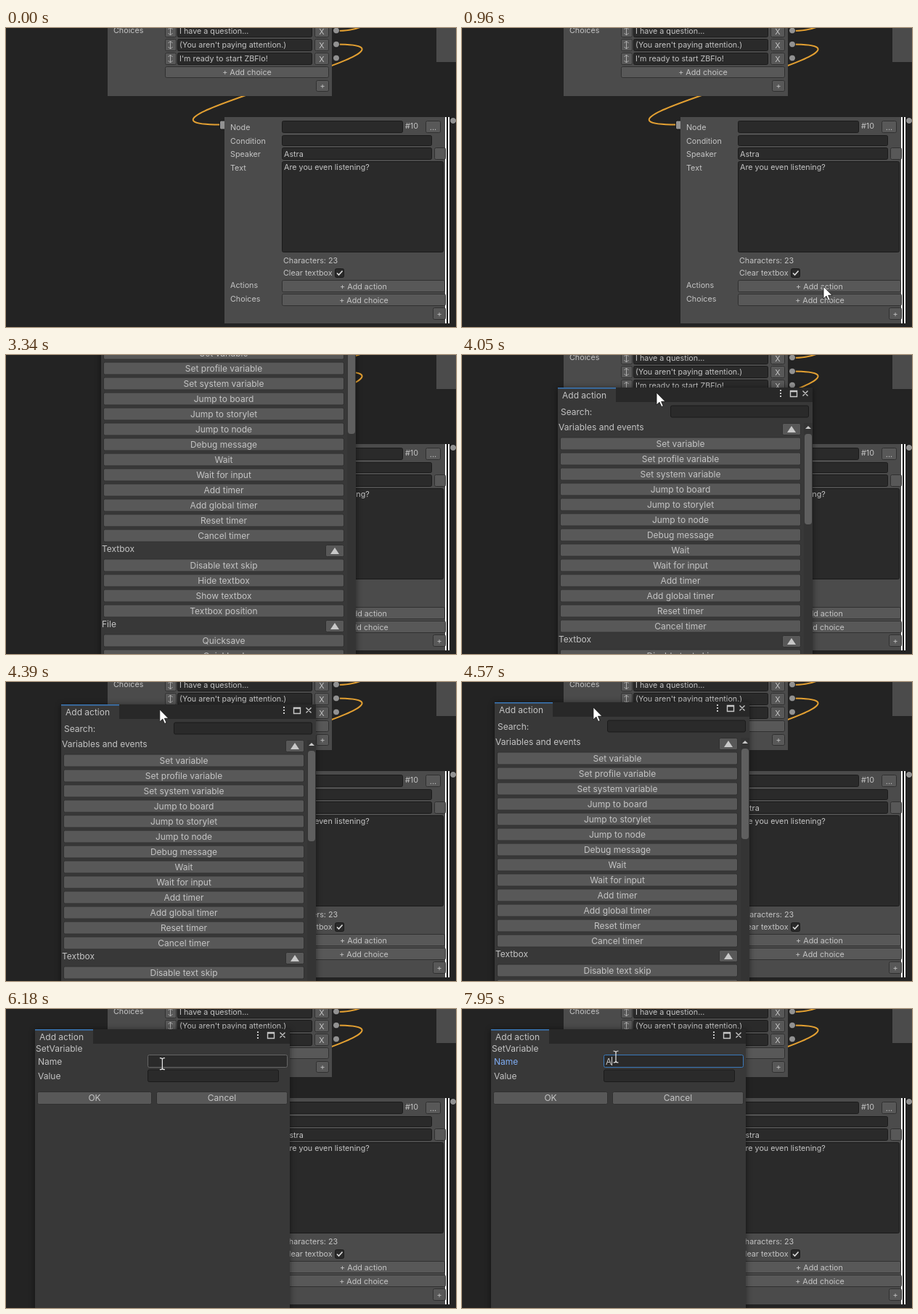
Animation of 620x413 px, one loop 8000 ms. Source, as an HTML page:

```html
<!DOCTYPE html>
<html lang="en">
<head>
<meta charset="utf-8">
<title>Node editor</title>
<style>
html, body { margin: 0; width: 100%; height: 100%; overflow: hidden; background: #232323; }
svg { display: block; width: 620px; height: 413px; font-family: Inter, "Open Sans", sans-serif; }
text { fill: #c4c4c4; white-space: pre; }
.graph text { font-size: 10.75px; }
.popup text { font-size: 12px; }
.mid { text-anchor: middle; }
.button { fill: #585858; stroke: #303030; }
.button.pressed { fill: #353535; stroke: #1e1e1e; }
.field { fill: #2a2a2a; stroke: #1b1b1b; }
.field.hover { stroke: #656565; }
.field.focus { stroke: #3a79bb; }
.panel { fill: #4b4b4b; }
.port { fill: #929292; stroke: #151515; }
.wire { fill: none; stroke: #e3a032; stroke-width: 2; }
</style>
</head>
<body>
<svg id="stage" viewBox="0 0 620 413"></svg>
<script>
const LOOP = 8000;
const GRIP = { x: 136, y: 7 }; // where the pointer holds the popup's title bar

// Cursor tip over time: [ms, x, y]
const PATH = [
  [500, 461, 413], [640, 478, 388], [760, 505, 362], [850, 515, 354], [960, 498, 357],
  [3110, 498, 357], [3150, 508, 345], [3220, 420, 200], [3310, 250, 4], [3340, 248, -24],
  [3341, 267, -73], [3989, 267, -73], [3990, 267, -40], [4020, 268, 12], [4050, 268, 52],
  [4210, 268, 52], [4300, 239, 44], [4390, 212, 38], [4500, 188, 35], [4620, 176, 35],
  [4870, 176, 35], [4950, 188, 50], [5040, 216, 80], [5120, 227, 93],
  [5560, 227, 93], [5630, 227, 108], [6100, 227, 108], [6150, 219, 86], [6210, 212, 66]
];

const rect = (x, y, w, h, cls, extra = '') =>
  `<rect x="${x}" y="${y}" width="${w}" height="${h}" class="${cls}" ${extra}/>`;
const box = (cls, x, y, w, h, id = '') =>
  rect(x + .5, y + .5, w - 1, h - 1, cls, `rx="2" ${id && `id="${id}"`}`);
const text = (x, y, s, cls = '', id = '') =>
  `<text x="${x}" y="${y}" class="${cls}" ${id && `id="${id}"`}>${s}</text>`;
const button = (x, y, w, h, label, id) =>
  box('button', x, y, w, h, id) + text(x + w / 2, y + h / 2 + 4.2, label, 'mid');
const field = (x, y, w, h, label = '', id = '') =>
  box('field', x, y, w, h, id) + text(x + 3, y + 12.3, label);
const port = (x, y) => `<circle cx="${x}" cy="${y}" r="4.5" class="port"/>`;

function choiceRow(y, label) {
  const arrows = `M226.5 ${y + 3}v11M223.5 ${y + 6}l3-3l3 3M223.5 ${y + 11}l3 3l3-3`;
  return box('button', 219, y, 16, 17) + `<path d="${arrows}" fill="none" stroke="#b0b0b0"/>` +
    field(236, y, 186, 17, label) + button(425, y, 20, 17, 'X') + port(455, y + 7.5);
}

function graph() {
  const labels = [['Node', 140.5], ['Condition', 159.5], ['Speaker', 177.5], ['Text', 196.5],
    ['Actions', 358.5], ['Choices', 377.5]];
  return `<g class="graph">
    <path class="wire" d="M453.500 22.500C628 22.500 120 133.500 295 133.500M455 4Q475 4 488 -1"/>` +
    rect(140, -5, 309, 99, 'panel') + rect(593, -5, 40, 52, 'panel') +
    text(148, 6.5, 'Choices') +
    choiceRow(-4, 'I have a question...') +
    choiceRow(15, "(You aren't paying attention.)") +
    choiceRow(34, "I'm ready to start ZBFlo!") +
    button(219, 53, 226, 16, '+ Add choice') + button(427, 72, 18, 16, '+') +
    rect(294.5, 128, 12, 12, 'port', 'rx="2"') +
    rect(301, 123, 304, 285, 'panel') +
    rect(605, 123, 2, 285, '', 'fill="#fff"') + rect(607, 123, 2, 285, '', 'fill="#161616"') +
    rect(609, 123, 2, 285, '', 'fill="#fff"') + port(616, 128) +
    labels.map(([s, y]) => text(309, y, s)).join('') +
    field(380, 128, 167, 17) + text(550, 139, '#10') + button(578, 128, 21, 17, '...') +
    field(380, 148, 207, 15) + field(380, 165, 207, 17) + text(383, 178, 'Astra') +
    box('button', 590, 165, 16, 17) +
    field(380, 184, 223, 126, 'Are you even listening?') +
    text(382, 324.5, 'Characters: 23') + text(382, 341.5, 'Clear textbox') +
    box('field', 453, 332, 13, 13) +
    '<path d="M456 338.500l2.500 2.500l5-5.500" fill="none" stroke="#ddd" stroke-width="1.600"/>' +
    button(380, 348, 225, 17, '+ Add action', 'addAction') +
    button(380, 367, 226, 17, '+ Add choice') + button(588, 386, 18, 17, '+') + '</g>';
}

function section(title, y, names) {
  return text(1, y + 4, title) + box('button', 309, y - 6, 26, 17) +
    `<path d="M316 ${y + 7}h12l-6-9z" fill="#c8c8c8"/>` +
    names.map((name, i) =>
      button(3, y + 13.5 + 21 * i, 332, 18, name, name === 'Set variable' ? 'setVariable' : '')).join('');
}

function popup() {
  const events = ['Set variable', 'Set profile variable', 'Set system variable', 'Jump to board',
    'Jump to storylet', 'Jump to node', 'Debug message', 'Wait', 'Wait for input', 'Add timer',
    'Add global timer', 'Reset timer', 'Cancel timer'];
  const textbox = ['Disable text skip', 'Hide textbox', 'Show textbox', 'Textbox position'];
  return '<g class="popup" id="popup">' +
    rect(0, 1, 351, 560, '', 'fill="#000" opacity=".5" filter="url(#blur)"') +
    rect(0, 0, 351, 560, '', 'fill="#383838"') +
    rect(80, 0, 271, 20, '', 'fill="#282828"') + rect(0, 0, 80, 1.5, '', 'fill="#3a79bb"') +
    text(6, 15, 'Add action') +
    [4, 8, 12].map(y => rect(306, y - 1, 2, 2, '', 'fill="#c8c8c8"')).join('') +
    `<path d="M320.500 4.500h9v8h-9zM320 5.500h10M337.500 4.500l7 7m0-7l-7 7" fill="none"
      stroke="#c8c8c8" stroke-width="1.400"/>` +
    '<g id="list">' +
    text(4, 37.5, 'Search:') + field(155, 24.5, 191, 17, '', 'search') +
    section('Variables and events', 55, events) +
    section('Textbox', 348, textbox) +
    section('File', 452, ['Quicksave', 'Quickload']) +
    rect(339, 49, 12, 512, '', 'fill="#343434"') +
    '<path d="M341 57h8l-4-4z" fill="#c8c8c8"/>' +
    rect(340, 64, 10, 125, '', 'rx="4" fill="#5f5f5f"') + '</g>' +
    '<g id="form">' +
    text(1, 31, 'SetVariable') + text(4, 49, 'Name', '', 'nameLabel') +
    field(155, 35, 193, 18, '', 'name') + text(158, 49, 'A', '', 'typed') +
    rect(0, 38, 1, 12, '', 'id="caret" fill="#d8d8d8"') +
    text(4, 69, 'Value') + field(155, 55.5, 181, 17.5, '', 'value') +
    button(3, 86, 158, 18, 'OK') + button(167, 86, 181, 18, 'Cancel') + '</g></g>';
}

const cursors = `<g id="cursor">
  <path id="arrow" d="M0 0V17L4 13.200L6.800 19.500L9.300 18.400L6.600 12.300H12Z" fill="#fff" stroke="#111" stroke-width=".8"/>
  <path id="beam" d="M-3.500 -8Q0 -8 0 -6Q0 -8 3.500 -8M0 -6V6M-3.500 8Q0 8 0 6Q0 8 3.500 8" fill="none" stroke="#e8e8e8" stroke-width="1.200"/>
</g>`;

document.getElementById('stage').innerHTML =
  '<defs><filter id="blur" x="-10%" y="-10%" width="120%" height="120%"><feGaussianBlur stdDeviation="4"/></filter></defs>' +
  rect(0, 0, 620, 413, '', 'fill="#232323"') + graph() + popup() + cursors;

const $ = id => document.getElementById(id);
const show = (id, on) => $(id).setAttribute('visibility', on ? 'inherit' : 'hidden');
const move = (id, x, y) => $(id).setAttribute('transform', `translate(${x} ${y})`);

function tip(t) {
  const i = PATH.findIndex(key => key[0] > t);
  const [t1, x1, y1] = PATH[i < 0 ? PATH.length - 1 : i];
  if (i <= 0) return { x: x1, y: y1 };
  const [t0, x0, y0] = PATH[i - 1];
  const u = (t - t0) / (t1 - t0);
  return { x: x0 + (x1 - x0) * u, y: y0 + (y1 - y0) * u };
}

function render(t) {
  const cursor = tip(t);
  const held = tip(Math.min(Math.max(t, 3400), 4620));
  const origin = { x: Math.round(held.x - GRIP.x), y: Math.round(held.y - GRIP.y) };
  const open = t >= 2520, form = t >= 5400, focused = t >= 6420, typed = t >= 7950;

  move('popup', origin.x, origin.y);
  show('popup', open);
  show('list', !form);
  show('form', form);
  $('addAction').classList.toggle('pressed', t >= 2460 && t < 2520);
  $('setVariable').classList.toggle('pressed', t >= 5300 && t < 5400);

  const over = id => {
    const r = $(id), [x, y, w, h] = ['x', 'y', 'width', 'height'].map(a => +r.getAttribute(a));
    const dx = cursor.x - origin.x - x, dy = cursor.y - origin.y - y;
    const hit = open && form === (id !== 'search') && dx >= 0 && dx <= w && dy >= 0 && dy <= h;
    r.classList.toggle('hover', hit);
    return hit;
  };
  const overField = ['search', 'name', 'value'].filter(over).length > 0;

  $('name').classList.toggle('focus', focused);
  $('nameLabel').style.fill = focused ? '#7fadf5' : '';
  // An inherited visibility keeps these hidden together with the form.
  show('typed', typed);
  show('caret', focused);
  $('caret').setAttribute('x', typed ? 166 : 158);

  show('cursor', t >= 500);
  move('cursor', cursor.x, cursor.y);
  show('arrow', !overField);
  show('beam', overField);
}

const start = performance.now();
function tick() {
  render((performance.now() - start) % LOOP);
  requestAnimationFrame(tick);
}
tick();
</script>
</body>
</html>
```
